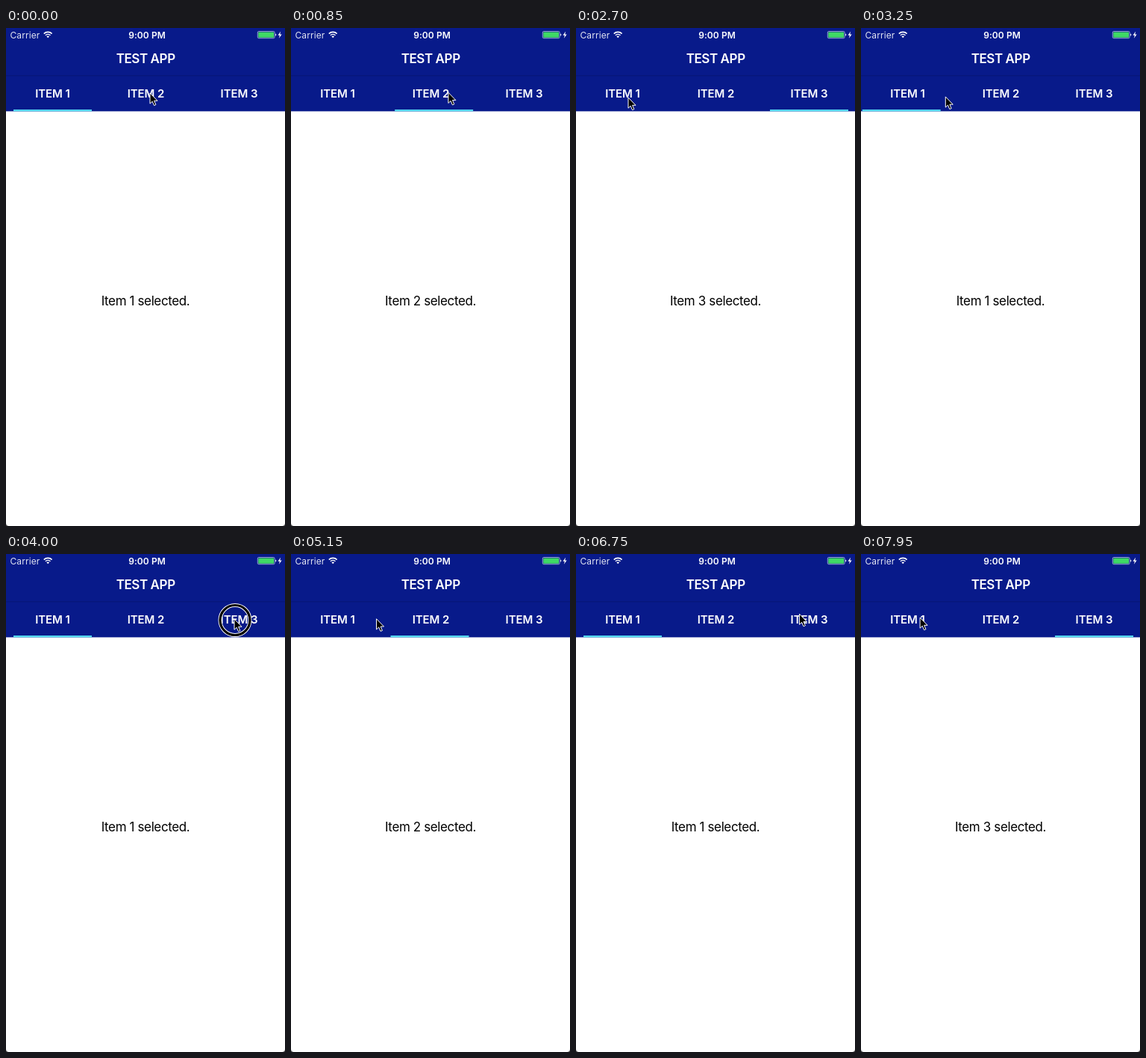
Recreate the animation shown at these times as an HTML page. Size 374 px wide and 666 px high, loop 8 s.

```html
<!DOCTYPE html>
<html lang="en">
<head>
<meta charset="utf-8">
<title>Tab bar</title>
<style>
  html, body { margin: 0; width: 100%; height: 100%; overflow: hidden; background: #fff; }
  svg { display: block; width: 100%; height: 100%; }
  text { font-family: Inter, Roboto, "Liberation Sans", sans-serif; fill: #fff; }
  .mid { text-anchor: middle; }
  .status { font-size: 12px; letter-spacing: .08px; }
  .bold { font-weight: 600; }
  .title { font-size: 17px; font-weight: 600; letter-spacing: -.4px; }
  .tab { font-size: 15px; font-weight: 600; letter-spacing: -.08px; }
  .label { font-size: 17px; letter-spacing: -.38px; fill: #000; }
</style>
</head>
<body>
<svg viewBox="0 0 374 666">
  <rect width="374" height="666" fill="#fff"/>
  <rect width="374" height="111.4" fill="#081a8a"/>
  <rect y="63.5" width="374" height=".7" fill="#06136c"/>

  <text class="status" x="5.5" y="13.5" fill-opacity=".88">Carrier</text>
  <g fill="none" stroke="#fff" stroke-width="1.6">
    <path d="M50.8 7.6a7.6 7.6 0 0 1 10.8 0"/>
    <path d="M52.9 9.8a4.7 4.7 0 0 1 6.6 0"/>
  </g>
  <path d="M54.4 11.3a2.6 2.6 0 0 1 3.6 0l-1.8 1.9z" fill="#fff"/>
  <text class="status bold mid" x="189" y="13.5">9:00 PM</text>
  <rect x="337.3" y="4.5" width="22.8" height="9.2" rx="1.5" fill="none" stroke="#b9c0e4" stroke-width=".8"/>
  <rect x="338.3" y="5.4" width="20.8" height="7.4" rx=".6" fill="#3fd965"/>
  <path d="M361 7.4q1.4 .4 1.4 1.7t-1.4 1.7z" fill="#d5d9f0"/>
  <path d="M368.2 4.6l-3.7 5.2h2.4l-1 3.9 3.8-5.3h-2.5z" fill="#fff"/>

  <text class="title mid" x="187.2" y="47">TEST APP</text>
  <text class="tab mid" x="62.5" y="93">ITEM 1</text>
  <text class="tab mid" x="187.5" y="93">ITEM 2</text>
  <text class="tab mid" x="312.5" y="93">ITEM 3</text>
  <rect id="bar" x="10" y="109" width="105" height="2.4" fill="#55d8f0"/>
  <text id="label" class="label mid" x="187" y="371">Item 1 selected.</text>

  <path d="M0 662q0 4 4 4h-4zM374 662q0 4-4 4h4z" fill="#444"/>

  <g id="pointer">
    <g id="ring" fill="none">
      <circle cx="1" cy="1.5" r="20" stroke="#fff" stroke-width="5"/>
      <circle cx="1" cy="1.5" r="20" stroke="#000" stroke-width="3.2"/>
    </g>
    <path d="M0 0V14.2L3.2 11.2 5.5 16.6 7.9 15.6 5.6 10.3H10Z" fill="#000" stroke="#fff" stroke-width="1"/>
  </g>
</svg>
<script>
  const LOOP = 8000, STEP = 50, HOLD = 150, LAG = 25;
  const $ = id => document.getElementById(id);
  const bar = $('bar'), label = $('label'), pointer = $('pointer'), ring = $('ring');

  // each tap: tab, press time, place, and when the pointer moves on
  const taps = [
    { tab: 2, down: 400,  x: 193, y: 87, leave: 770 },
    { tab: 3, down: 1450, x: 314, y: 82, leave: 1750 },
    { tab: 1, down: 2800, x: 70,  y: 93, leave: 3100 },
    { tab: 3, down: 4000, x: 306, y: 87, leave: 4180 },
    { tab: 2, down: 4550, x: 186, y: 85, leave: 4965 },
    { tab: 1, down: 5400, x: 61,  y: 88, leave: 6230 },
    { tab: 3, down: 7250, x: 303, y: 80, leave: 7430 }
  ];
  const exit = { x: 79, y: 85 };

  const tabX = n => 10 + (n - 1) * 125;
  const clamp = u => Math.min(1, Math.max(0, u));
  const ease = u => u * u * (3 - 2 * u);

  // remaining distance of an underdamped spring after ms
  function spring(ms) {
    if (ms <= 0) return 1;
    const s = ms / 1000, decay = 11, freq = 10.45;
    return Math.exp(-decay * s) * (Math.cos(freq * s) + decay / freq * Math.sin(freq * s));
  }

  // longer trips take longer
  function travel(from, to, ms) {
    const dx = to.x - from.x, dy = to.y - from.y;
    const u = ease(clamp(ms / (100 + 1.9 * Math.hypot(dx, dy))));
    return [from.x + dx * u, from.y + dy * u];
  }

  function draw(t) {
    let tab = 1, x = tabX(1), place = [taps[0].x, taps[0].y];
    taps.forEach((tap, i) => {
      const sinceUp = t - tap.down - HOLD;
      if (sinceUp >= 0) {
        const from = tabX(tab), to = tabX(tap.tab);
        x = to + (from - to) * spring(sinceUp - LAG);
        tab = tap.tab;
      }
      if (t >= tap.leave) place = travel(tap, taps[i + 1] || exit, t - tap.leave);
    });
    const pressed = taps.some(({ down }) => t >= down && t < down + HOLD);

    bar.setAttribute('x', x.toFixed(2));
    label.textContent = `Item ${tab} selected.`;
    pointer.setAttribute('transform', `translate(${place.map(v => v.toFixed(2))})`);
    ring.setAttribute('visibility', pressed ? 'visible' : 'hidden');
  }

  const start = performance.now();
  function tick() {
    const t = (performance.now() - start) % LOOP;
    draw(Math.floor(t / STEP) * STEP);
    requestAnimationFrame(tick);
  }
  tick();
</script>
</body>
</html>
```
